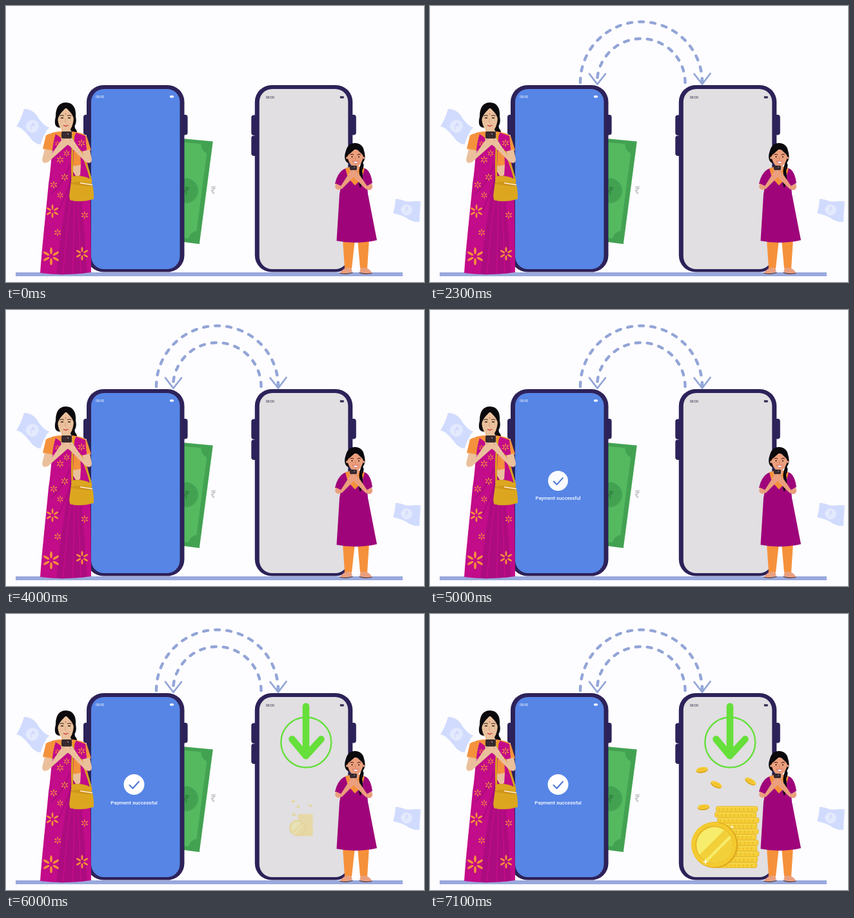
These frames come from a looping animation (648x429 px, 8 s). An HTML page:

```html
<!DOCTYPE html>
<html lang="en">
<head>
<meta charset="utf-8">
<title>Phone payment</title>
<style>
  html, body { margin: 0; width: 100%; height: 100%; overflow: hidden; background: #fdfcfe; }
  svg { display: block; width: 648px; height: 429px; }
  text { font-family: Roboto, sans-serif; }
  .rupee { font-family: "Noto Sans", sans-serif; text-anchor: middle; }
  .line { fill: none; stroke-linecap: round; stroke-linejoin: round; }
  .arc { stroke: #93a5d7; stroke-width: 4.4; }
  .dash { stroke-dasharray: 7 11.1; }
  .skin { fill: #eac09b; }
  .tan { fill: #eb9f7d; }
  .hair { fill: #0b090c; }
</style>
</head>
<body>
<svg viewBox="0 0 648 429">
  <defs>
    <g id="flower" fill="#f6903a"></g>
    <clipPath id="wipeA"><rect id="barA" x="225" y="15" height="115"/></clipPath>
    <clipPath id="wipeB"><rect id="barB" y="40" height="90"/></clipPath>
    <clipPath id="wipeC"><rect id="barC" x="420" y="134" width="92"/></clipPath>
    <path id="sareeShape" d="M77 199C70 220 71 245 66 276C62 320 56 372 53 415Q92 420 132 414L131 300L127 245L123 202L109 197L98 214Z"/>
    <clipPath id="sareeClip"><use href="#sareeShape"/></clipPath>
    <clipPath id="coinFace"><circle cx="441" cy="359" r="28"/></clipPath>
  </defs>

  <!-- floating notes -->
  <g fill="#d1dbfe">
    <path d="M28 160C37 160 44 164 49 172C54 180 60 187 67 188.500C61 195 57 205 53.500 215.500C46 214 41 210 36 203C30 195 24 189 16 187C22 179 25 169 28 160Z"/>
    <circle cx="41" cy="187" r="10" fill="#e4eafd"/>
    <text class="rupee" transform="translate(41 187) rotate(28)" y="5" font-size="14" fill="#c9d5f9">₹</text>
    <path d="M604 300C612 299 618 305 627 304C633 303 638 303 643 304C642 315 641 325 641 335C633 337 626 333 620 329C613 325 607 324 600 322C603 315 603 307 604 300Z"/>
    <circle cx="621" cy="317" r="8.5" fill="#e4eafd"/>
    <text class="rupee" transform="translate(621 317) rotate(8)" y="4.3" font-size="12" fill="#c9d5f9">₹</text>
  </g>

  <!-- bill -->
  <g transform="translate(310.3 290.3) rotate(7.5)">
    <path d="M-80 -77.500L0 -80.500V80.500H-80Z" fill="#43a252"/>
    <path d="M-70 -72.500L-18 -74Q-16 -63 -7 -61V61Q-16 63 -18 74H-70Z" fill="#54b95f"/>
    <circle cx="-32" cy="1" r="19.5" fill="#43a252"/>
    <text class="rupee" x="-30" y="7" font-size="17" font-weight="500" fill="#2f7a40">₹</text>
  </g>
  <text class="rupee" x="321.5" y="292.3" font-size="16.500" font-weight="600" fill="#c8c7c8">₹</text>

  <rect x="15" y="414" width="600" height="6" fill="#98a9dc"/>
  <g id="phones"></g>

  <!-- arrows between the phones -->
  <g class="line arc" clip-path="url(#wipeA)">
    <path class="dash" d="M233 119A94.5 94.5 0 0 1 422 119"/>
    <path d="M409.500 105.500L422 121.500L434.500 105" stroke-width="2.8"/>
  </g>
  <g class="line arc" clip-path="url(#wipeB)">
    <path class="dash" d="M395.5 119A68.2 68.2 0 0 0 259 119"/>
    <path d="M247 105.500L259.500 121.500L272 105.500" stroke-width="2.8"/>
  </g>

  <!-- woman -->
  <g>
    <path class="hair" d="M82 189C75 188 75 180 77 172C77 158 82 150 93 150C104 150 109 159 108 172C110 180 108 187 103 189Z"/>
    <path class="hair" d="M101 181Q107 184 107 190Q112 195 109 203L103 199L99 190Z"/>
    <path d="M62 201Q74 195 84 195L103 195Q120 197 125 202L132 224L117 227L118 252L72 248L74 226L57 222Z" fill="#f4913c"/>
    <path class="skin" d="M86 186H100V197Q93 206 86 197Z"/>
    <path class="skin" d="M80 171C80 155 105 155 105 171C105 188 98 196 92.500 196C87 196 80 187 80 171Z"/>
    <path class="hair" d="M80 177C77 160 84 153 93 153C103 153 109 161 105.500 177C104 169 99 164 93 158C87 164 82 169 80 177Z"/>
    <g class="line" stroke="#2a1512" stroke-width="1">
      <path d="M84 170.500Q87 169 89.500 170.500M95.500 170.500Q98 169 101 170.500"/>
      <path d="M85.500 174H88.500M96.500 174H99.500" stroke-width="1.4"/>
      <path d="M92 175L91.500 180H93.500" stroke="#d59a77" stroke-width=".8"/>
      <path d="M89.500 185.500Q92.500 188 96 185.500" stroke="#c8403f" stroke-width="1.4"/>
    </g>
    <circle cx="92.500" cy="168" r=".8" fill="#c41c46"/>
    <use href="#sareeShape" fill="#c20c89"/>
    <path class="skin" d="M104 247L116 247L115 263Q109 266 104 262Z"/>
    <path d="M105 226L115 222L116 247L104 249Z" fill="#f4913c"/>
    <g clip-path="url(#sareeClip)">
      <path d="M101 252C96 285 86 340 78 418H126C124 380 120 335 117 300L108 264Z" fill="#ac0c7f"/>
      <g class="line" stroke="#c20c89" stroke-width="1.8">
        <path d="M104 275C97 310 94 360 88 417M108 285C104 320 106 370 103 417M112 296C111 330 116 375 116 417"/>
      </g>
      <path class="line" d="M100 245C90 272 80 284 70 292M101 272L82 318" stroke="#a30c79" stroke-width="1.6"/>
      <g id="flowers"></g>
    </g>
    <path class="line" d="M105 200C102 225 102 250 103 272M116 226Q126 246 132 272" stroke="#d9a21e" stroke-width="3"/>
    <path d="M102 265Q117 262 131 269Q137 284 136 300Q117 306 100 302Q97 299 99 288Z" fill="#dca71f"/>
    <path d="M101 274Q116 271 133 276L134 280Q116 281 101 276Z" fill="#cf9619"/>
    <path d="M115 275L134 278" stroke="#fff3dc" stroke-width="1.6"/>
    <g class="skin">
      <path d="M60 222L73 225L70 231L87 207L98 207L101 213L94 217L66 242Q57 247 56 239Z"/>
      <path d="M130 223L118 226L120 232L103 206L94 207L92 213L98 217L123 242Q132 247 133 239Z"/>
      <path d="M85 205Q93 202 103 205L102 214Q94 218 87 213Z"/>
    </g>
    <rect x="86" y="195" width="16" height="11" rx="2" fill="#352a2e"/>
    <circle cx="96" cy="199" r="1.2" fill="#85707a"/>
    <path class="line" d="M87 209L92 206M101 209L97 206" stroke="#d6a17c" stroke-width=".8"/>
  </g>

  <!-- success message -->
  <g id="success">
    <circle cx="198.500" cy="265" r="16" fill="#fff"/>
    <path class="line" d="M191.500 266L196.500 271L206 260.500" stroke="#4975d2" stroke-width="2"/>
    <text x="198.600" y="295.800" font-size="8" font-weight="500" fill="#fff" text-anchor="middle">Payment successful</text>
  </g>

  <g class="line" stroke="#66df3b" clip-path="url(#wipeC)">
    <circle cx="465.300" cy="199.500" r="39" stroke-width="2.4"/>
    <path d="M465 143.500V219M443.500 194.500L465 220.500L488.500 194.500" stroke-width="10.600"/>
  </g>

  <g id="coins">
    <g id="stack"></g>
    <g id="loose"></g>
    <circle cx="441.500" cy="359" r="36" fill="#dfa91f"/>
    <circle cx="440" cy="358.500" r="35" fill="#f4ca2f"/>
    <circle cx="440.500" cy="358.500" r="29" fill="#e2b022"/>
    <g clip-path="url(#coinFace)">
      <rect x="410" y="328" width="62" height="62" fill="#f7ec6b"/>
      <path d="M410 382L472 320V390H410Z" fill="#f2d03a"/>
      <path d="M410 399L472 337V343L416 399Z" fill="#f7ec6b"/>
    </g>
    <path id="spark" d="M0 -5L1 -1L5 0L1 1L0 5L-1 1L-5 0L-1 -1Z" transform="translate(468 331) scale(.7)" fill="#fffdf0"/>
    <path d="M0 -5L1 -1L5 0L1 1L0 5L-1 1L-5 0L-1 -1Z" transform="translate(427 385)" fill="#fffdf0"/>
  </g>

  <!-- girl -->
  <g>
    <path d="M522 362H541L536 408H525ZM545 362H563L560 408H549Z" fill="#f6913b"/>
    <path class="tan" d="M526 407H535L537 413Q528 417 518 415Q520 411 526 407ZM550 407H559Q566 411 567 415Q556 417 548 413Z"/>
    <path d="M518 415.500Q528 417.500 537 414.500M548 414.500Q556 417.500 567 415.500" class="line" stroke="#633225" stroke-width="1.2"/>
    <path class="hair" d="M530 244C523 240 525 230 527 225C529 217 534 213 541 213C549 213 554 218 555 225C557 232 558 239 552 245Z"/>
    <path d="M528 252Q541 247 555 252Q565 254 568 275L560 280L561 292L575 364Q543 371 512.500 365L517 292L519 281L510 276Q515 255 528 252Z" fill="#9f047b"/>
    <path d="M526 252Q541 247 556 252L552 267L541 279L530 267Z" fill="#f6913b"/>
    <path class="tan" d="M535 243H547V254L541 260L535 254Z"/>
    <path class="tan" d="M529.500 232C529.500 220 553.500 220 553.500 232C553.500 244 547 250 541.500 250C536 250 529.500 243 529.500 232Z"/>
    <circle class="tan" cx="529" cy="236" r="2"/><circle class="tan" cx="554" cy="236" r="2"/>
    <path class="hair" d="M528 235C526 221 533 215 541 215C550 215 556 222 555 235C553 230 548 227 542 221C537 227 531 230 528 235Z"/>
    <path class="hair" d="M552 242Q557 247 552 256Q555 270 549 283Q545 273 548 262Q546 252 552 242Z"/>
    <g class="line" stroke="#2a1512" stroke-width="1">
      <path d="M534 231Q536 229.500 538.500 231M545 231Q547 229.500 549.500 231"/>
      <path d="M536.500 234V235M547 234V235" stroke-width="1.6"/>
      <path d="M541.500 234.500L541 238H542.500" stroke="#c97556" stroke-width=".8"/>
    </g>
    <path d="M537.500 241Q542 242.500 546.500 241Q545.500 245 542 245Q538.500 245 537.500 241Z" fill="#fff" stroke="#b93b3b" stroke-width=".7"/>
    <g class="tan">
      <path d="M511.500 276L520 280L519 280L533 258L541 256L543 262L521 284Q512 288 510 281Z"/>
      <path d="M567.500 276L559 280L560 280L545 258L537 256L536 263L557 284Q566 289 568 282Z"/>
      <path d="M532 254Q538 251 545 254L544 262Q538 267 533 262Z"/>
    </g>
    <rect x="533" y="248" width="11" height="7" rx="1.500" fill="#352a2e"/>
    <circle cx="540" cy="250.500" r="1" fill="#85707a"/>
    <path class="line" d="M533 257.500L537 255.500M544 257.500L541 255.500" stroke="#ca7a5b" stroke-width=".8"/>
  </g>
</svg>
<script>
  const LOOP = 8000;
  const $ = id => document.getElementById(id);

  const phone = (x, screen, ink, dx, dy, buttons) =>
    buttons.map(([bx, by]) => `<rect x="${x + bx}" y="${by}" width="12" height="31.5" rx="4" fill="#2d2259"/>`).join('') +
    `<rect x="${x}" y="123" width="151.5" height="290.5" rx="26" fill="#2d2259"/>
     <rect x="${x + 7}" y="129" width="137.5" height="280" rx="20" fill="${screen}"/>
     <text x="${x + 14 + dx}" y="${142.5 + dy}" font-size="5.3" fill="${ink}">08:00</text>
     <rect x="${x + 129 + dx}" y="${139.3 + dy}" width="6" height="3.2" rx="1" fill="${ink}"/>`;

  $('phones').innerHTML =
    phone(125, '#5685e6', '#fff', 0, 0, [[-5, 169], [144.6, 169]]) +
    phone(385.8, '#e1dfe1', '#33294f', 3, 1, [[-5.5, 169.5], [-5.5, 201.5], [145, 169]]);

  $('flower').innerHTML = [0, 60, 120, 180, 240, 300]
    .map(a => `<ellipse cy="-8" rx="1.8" ry="5" transform="rotate(${a})"/>`).join('');

  const flowers = [
    [72, 319, .8], [70, 389, 1.05], [118, 385, .8], [91, 266, .45], [84, 239, .45],
    [74, 278, .45], [84, 294, .4], [117, 213, .45], [94, 229, .4],
    [80, 352, .45], [122, 325, .45], [80, 214, .35]
  ];
  $('flowers').innerHTML = flowers
    .map(([x, y, s]) => `<use href="#flower" transform="translate(${x} ${y}) scale(${s})"/>`).join('');

  const shift = [2, 0, 4, 1, 3, 0, 3, 1, 4, 2, 1];
  $('stack').innerHTML = shift.map((dx, i) => {
    const x = 441.5 + dx, y = 299 + 8.7 * i;
    return `<rect x="${x}" y="${y}" width="64.5" height="8.5" rx="3" fill="#f5cf38" stroke="#e3b126" stroke-width=".7"/>
      <path d="M${x + 4} ${y + 4.8}h57" stroke="#e3b126" stroke-width="4.2" stroke-dasharray="1 5.4"/>
      <path d="M${x + 3} ${y + 1.8}h59" stroke="#f8de58" stroke-width="1"/>`;
  }).join('');

  const loose = [[421.5, 242, -10], [444, 265, 25], [497, 260, 30], [424, 300, -6]];
  $('loose').innerHTML = loose.map(([x, y, a]) =>
    `<g transform="translate(${x} ${y}) rotate(${a})"><ellipse cy="1" rx="9.2" ry="4" fill="#dfa921"/>
     <ellipse cy="-.6" rx="9" ry="3.4" fill="#f5cf3a"/><ellipse cy="-.7" rx="6.2" ry="1.8" fill="#f2c22c"/></g>`).join('');

  const ramp = (t, start, length) => Math.min(1, Math.max(0, (t - start) / length));

  function zoom(id, x, y, p) {
    $(id).setAttribute('transform', `translate(${x} ${y}) scale(${p}) translate(${-x} ${-y})`);
    $(id).setAttribute('opacity', p);
  }

  function draw() {
    const t = performance.now() % LOOP;
    const back = 165 * ramp(t, 1020, 960);
    $('barA').setAttribute('width', 215 * ramp(t, 20, 960));
    $('barB').setAttribute('x', 405 - back);
    $('barB').setAttribute('width', back);
    $('barC').setAttribute('height', 108 * ramp(t, 5040, 580));
    zoom('success', 198.5, 280, ramp(t, 3980, 1055));
    zoom('coins', 458, 318, ramp(t, 5630, 1050));
    requestAnimationFrame(draw);
  }
  draw();
</script>
</body>
</html>
```
